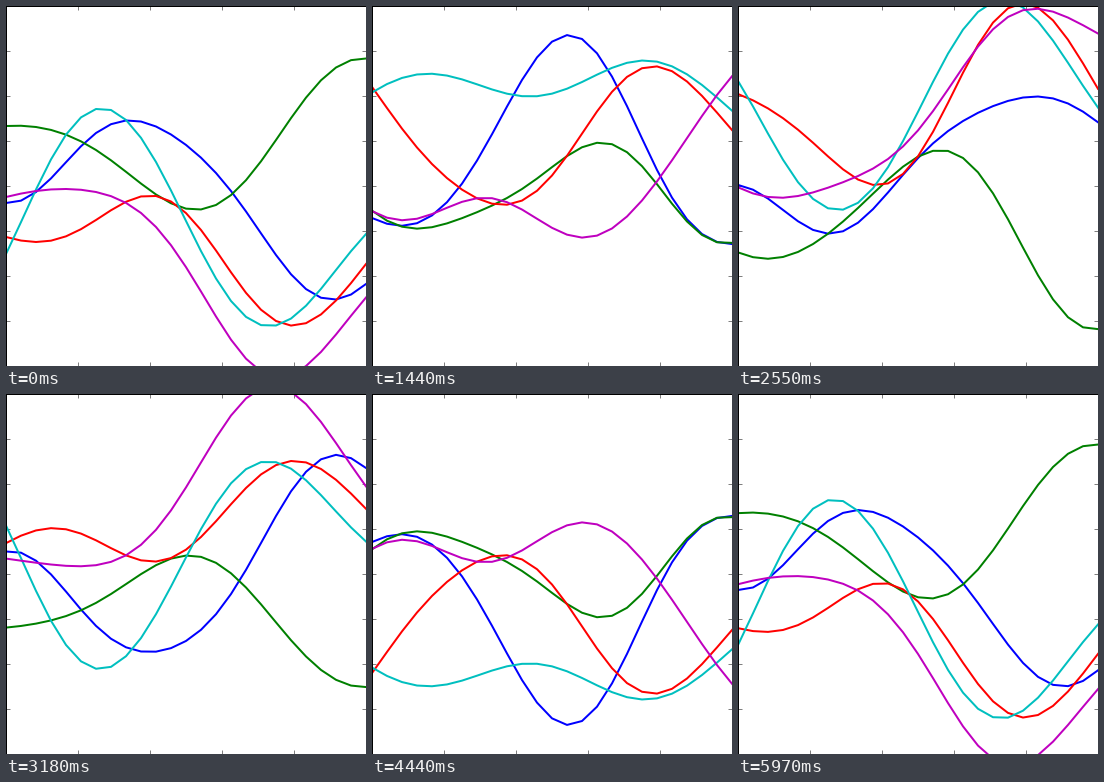
These frames come from a looping animation (360x360 px, 6000 ms). A matplotlib script:

```python
import numpy as np
import matplotlib.pyplot as plt
from matplotlib.animation import FuncAnimation

SIZE, DPI = 360, 72
FRAMES, INTERVAL = 200, 30
LENGTH_SCALE = 84

# Key points of each curve: real part at the start of the loop,
# imaginary part a quarter turn later, in pixels below the midline.
KNOTS = np.array([0, 30, 90, 150, 210, 270, 330, 360])
CURVES = {
    "#0000ff": [17+31j, 6+39.5j, -53+1j, -59.5-102.5j, -13-146.5j, 69-52j, 113.5+41j, 98+52j],
    "#008000": [-60+28.5j, -59+44.5j, -36+34.5j, 8.5+2.5j, 19-40j, -46-17j, -118.5+56.5j, -127.5+65j],
    "#ff0000": [51-102.5j, 56-61j, 34+1.5j, 10+14j, 64.5-56.5j, 135-126.5j, 114.5-97.5j, 78-61j],
    "#00bfbf": [68-98j, 3.5-108.5j, -77-102j, -24-88.5j, 92.5-110j, 139.5-134.5j, 84-106.5j, 48-78.5j],
    "#bf00bf": [11+24.5j, 5+34j, 6+15.5j, 41+21j, 130.5+43.5j, 191+2.5j, 148.5-79.5j, 111.5-117j],
}


def kernel(a, b):
    return np.exp(-0.5 * ((a[:, None] - b) / LENGTH_SCALE) ** 2)


def smooth(values, x):
    """Gaussian process mean through the key points."""
    return kernel(x, KNOTS) @ np.linalg.solve(kernel(KNOTS, KNOTS), np.array(values))


fig = plt.figure(figsize=(SIZE / DPI, SIZE / DPI), dpi=DPI, facecolor="white")
ax = fig.add_axes([0, 0, 1, 1])
ax.set_xlim(0, SIZE)
ax.set_ylim(SIZE / 2, -SIZE / 2)
ax.set_xticks(np.arange(0, SIZE + 1, 72))
ax.set_yticks(np.arange(-SIZE // 2, SIZE // 2 + 1, 45))
ax.tick_params(direction="in", length=4, width=0.5, top=True, right=True,
               labelbottom=False, labelleft=False)
for spine in ax.spines.values():
    spine.set_linewidth(1)

x = np.linspace(0, SIZE, 25)
paths = [smooth(keys, x) for keys in CURVES.values()]
lines = [ax.plot(x, path.real, color=color, lw=2, solid_joinstyle="round")[0]
         for color, path in zip(CURVES, paths)]


def update(i):
    # Every point swings as the projection of one steady rotation.
    turn = np.exp(-2j * np.pi * i / FRAMES)
    for line, path in zip(lines, paths):
        line.set_ydata((path * turn).real)
    return lines


anim = FuncAnimation(fig, update, frames=FRAMES, interval=INTERVAL,
                     repeat=True, repeat_delay=0)
plt.show()
```
